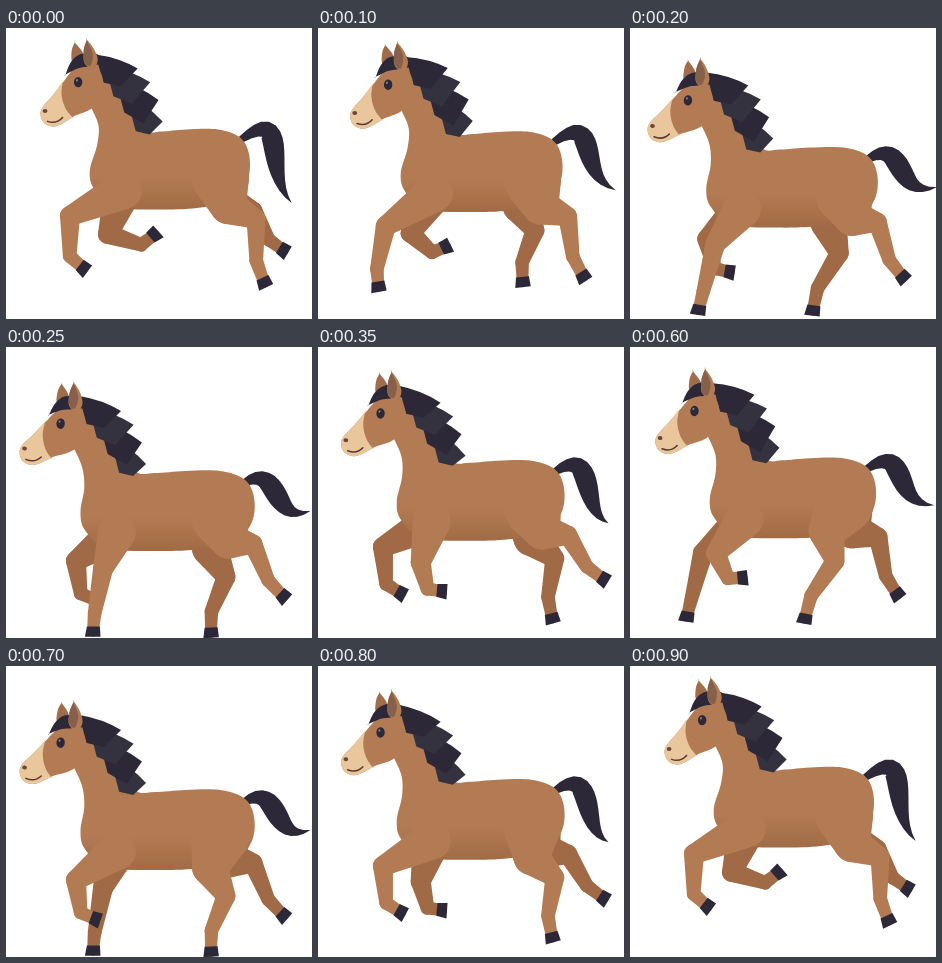
Animation, 306 px wide and 291 px high, one loop 950 ms. Source, as an HTML page with a canvas:

```html
<!DOCTYPE html>
<html lang="en">
<head>
<meta charset="utf-8">
<title>Trotting horse</title>
<style>
html, body { margin: 0; width: 100%; height: 100%; overflow: hidden; background: #fff; }
canvas { display: block; width: 306px; height: 291px; }
</style>
</head>
<body>
<canvas id="stage"></canvas>
<script>
const W = 306, H = 291, LOOP = 950, STEP = 50, STRIDE = 900, BOB = STRIDE / 2;
const COAT = '#b27b53', FAR = '#9f6a45', DARK = '#2c2838', LOCK = '#35323f', PALE = '#eac69c', EAR = '#87604b';
const canvas = document.getElementById('stage');
const ctx = canvas.getContext('2d');
const dpr = window.devicePixelRatio || 1;
canvas.width = W * dpr;
canvas.height = H * dpr;

// Key poses of one leg: middle joint, then hoof
const TIMES = [0, 150, 250, 450, 600, 700];
const FORE = [[64, 188, 77, 240], [73, 206, 57, 269], [97, 222, 87, 284],
  [102, 206, 148, 207], [86, 206, 112, 231], [70, 214, 89, 253]];
const HIND = [[250, 191, 258, 254], [248, 190, 267, 247], [247, 197, 277, 249],
  [247, 183, 277, 222], [205, 214, 175, 271], [220, 230, 205, 285]];

const TORSO = [[86, 80], [93, 98], [91, 118], [84, 142], [88, 160], [107, 178], [150, 181],
  [195, 179], [228, 169], [242, 150], [243, 126], [234, 109], [212, 101], [180, 101],
  [155, 103], [141, 101], [122, 70], [105, 38], [88, 30], [72, 50]];

const clamp = (v, lo, hi) => Math.max(lo, Math.min(hi, v));
const mix = (a, b, u) => a.map((v, i) => v + (b[i] - v) * u);

// Point on a Bezier curve of any degree
function bezier(pts, u) {
  while (pts.length > 1) pts = pts.slice(1).map((p, i) => mix(pts[i], p, u));
  return pts[0];
}

// Smooth periodic interpolation between key poses
function pose(keys, t) {
  const n = TIMES.length;
  const at = i => {
    const turn = Math.floor(i / n), j = i - turn * n;
    return { t: TIMES[j] + turn * STRIDE, v: keys[j] };
  };
  t %= STRIDE;
  let i = n - 1;
  while (TIMES[i] > t) i--;
  const [a, b, c, d] = [at(i - 1), at(i), at(i + 1), at(i + 2)];
  const h = c.t - b.t, u = (t - b.t) / h;
  const reach = (p, q, s) => p.v.map((v, j) => (q.v[j] - v) / (q.t - p.t) * h / 3 * s);
  const out = reach(a, c, 1), back = reach(b, d, -1);
  const [x, y, hx, hy] = bezier([b.v, b.v.map((v, j) => v + out[j]), c.v.map((v, j) => v + back[j]), c.v], u);
  return [[x, y], [hx, hy]];
}

// Point at fraction u from a to b, pushed sideways
function bend(a, b, u, push) {
  const dx = b[0] - a[0], dy = b[1] - a[1], len = Math.hypot(dx, dy);
  return [a[0] + dx * u - dy / len * push, a[1] + dy * u + dx / len * push];
}

function poly(pts, fill) {
  ctx.beginPath();
  pts.forEach(p => ctx.lineTo(p[0], p[1]));
  ctx.closePath();
  ctx.fillStyle = fill;
  ctx.fill();
}

// Closed curve through the points; a doubled point makes a corner
function blob(pts, fill) {
  const n = pts.length, at = i => pts[(i + n) % n];
  ctx.beginPath();
  ctx.moveTo(pts[0][0], pts[0][1]);
  for (let i = 0; i < n; i++) {
    const [a, b, c, d] = [at(i - 1), at(i), at(i + 1), at(i + 2)];
    ctx.bezierCurveTo(b[0] + (c[0] - a[0]) / 6, b[1] + (c[1] - a[1]) / 6,
      c[0] - (d[0] - b[0]) / 6, c[1] - (d[1] - b[1]) / 6, c[0], c[1]);
  }
  ctx.fillStyle = fill;
  ctx.fill();
}

function oval(x, y, rx, ry, fill) {
  ctx.beginPath();
  ctx.ellipse(x, y, rx, ry, 0, 0, 7);
  ctx.fillStyle = fill;
  ctx.fill();
}

// Chain of tapered capsules ending in a hoof
function leg(pts, radii, fill) {
  let dir;
  ctx.fillStyle = fill;
  for (let i = 0; i + 1 < pts.length; i++) {
    const [a, b] = [pts[i], pts[i + 1]], [ra, rb] = [radii[i], radii[i + 1]];
    const dx = b[0] - a[0], dy = b[1] - a[1];
    const off = Math.acos(clamp((ra - rb) / Math.hypot(dx, dy), -1, 1));
    dir = Math.atan2(dy, dx);
    ctx.beginPath();
    ctx.arc(a[0], a[1], ra, dir + off, dir - off + 2 * Math.PI);
    ctx.arc(b[0], b[1], rb, dir - off, dir + off);
    ctx.closePath();
    ctx.fill();
  }
  ctx.save();
  ctx.translate(...pts[pts.length - 1]);
  ctx.rotate(dir);
  poly([[-5, -6.5], [5, -8], [6.5, 7.5], [-4, 6.5]], DARK);
  ctx.restore();
}

function legs(t, k, fill) {
  const hip = [214, 148 + 22 * k], [hock, heel] = pose(HIND, t);
  leg([hip, bend(hip, hock, .5, 13), hock, bend(hock, heel, .65, 5), heel], [29, 18, 9.5, 6.8, 5.8], fill);

  // A shortened foreleg folds at the fetlock
  const shoulder = [117 - 6 * k, 162 + 23 * k], [knee, toe] = pose(FORE, t);
  const fold = clamp(64 - Math.hypot(toe[0] - knee[0], toe[1] - knee[1]), 0, 10);
  leg([shoulder, knee, bend(knee, toe, .72, fold), toe], [19, 10, 6.8, 5.8], fill);
}

function tail(k, wave) {
  const x = 235 + 3 * k, y = 111 + 25 * k;
  const spine = [[x, y], [x + 50 - 13 * k, y - 36 + 14 * k], [255 + 10 * k, y + 30 + 13 * k],
    [296 - 11 * Math.cos(wave + .35), 168 + 10 * Math.cos(wave + .8)]];
  const left = [], right = [];
  for (let s = 0; s < 1; s += 1 / 16) {
    const p = bezier(spine, s), q = bezier(spine, s + .01);
    const w = 3.5 * (1 - s) + 8.5 * Math.sin(Math.PI * s);
    left.push(bend(p, q, 0, w));
    right.unshift(bend(p, q, 0, -w));
  }
  poly([...left, spine[3], ...right], DARK);
}

function mane(k, wave) {
  const crest = [[90, 26], [113, 50], [144, 106]], tips = [[132, 40], [154, 58], [157, 93]];
  ctx.save();
  ctx.translate(-17 * k, 23 * k);
  for (let i = 3; i >= 0; i--) {
    const u = i / 5, root = bezier(crest, u), end = bezier(crest, Math.min(1, u + .5));
    const inner = bezier(crest, u + .22), [tx, ty] = bezier(tips, i / 3);
    const tip = [tx, ty - 3 * Math.sin(wave)];
    const over = mix(root, tip, .5), under = mix(tip, end, .5);
    ctx.beginPath();
    ctx.moveTo(...root);
    ctx.quadraticCurveTo(over[0] + 2, over[1] - 4, ...tip);
    ctx.quadraticCurveTo(under[0] - 1, under[1] + 1, ...end);
    ctx.lineTo(inner[0] - 3, inner[1] + 16);
    ctx.closePath();
    ctx.fillStyle = i % 2 ? LOCK : DARK;
    ctx.fill();
  }
  ctx.restore();
}

function head(k) {
  ctx.save();
  ctx.translate(72 - 18 * k, 54 + 23 * k);
  ctx.rotate(.113 * k);
  ctx.translate(-72, -54);
  blob([[69, 14], [69, 14], [66, 22], [67, 34], [78, 34], [77, 24]], '#a06d4c');
  blob([[76, 32], [64, 45], [58, 53], [47, 67], [37, 79], [35, 87], [39, 95], [48, 98],
    [57, 95], [68, 88], [86, 80], [98, 66], [94, 42]], COAT);
  blob([[57, 53], [57, 53], [47, 67], [37, 79], [35, 87], [39, 95], [48, 98], [57, 95],
    [67, 89], [67, 89], [60, 80], [56, 67]], PALE);
  blob([[60, 46], [60, 46], [65, 34], [74, 26], [90, 25], [97, 34], [82, 38], [72, 40]], DARK);
  blob([[81, 11], [81, 11], [78, 22], [79, 35], [88, 40], [92, 31], [88, 20]], COAT);
  blob([[81, 12], [81, 12], [78, 22], [79, 34], [85, 37], [87, 25]], EAR);
  oval(72.5, 53.7, 4.2, 5.2, DARK);
  oval(71.3, 51.8, 1, 1.2, '#85808a');
  oval(39.5, 82.5, 2.4, 2, '#6b4639');
  ctx.beginPath();
  ctx.moveTo(42, 93);
  ctx.quadraticCurveTo(51, 96, 57, 89);
  ctx.strokeStyle = '#583a31';
  ctx.lineWidth = 1.5;
  ctx.lineCap = 'round';
  ctx.stroke();
  ctx.restore();
}

function torso(k) {
  const coat = ctx.createLinearGradient(0, 95 + 22 * k, 0, 183 + 22 * k);
  coat.addColorStop(0, COAT);
  coat.addColorStop(.6, COAT);
  coat.addColorStop(1, '#a06a45');
  // The body stretches a little as it sinks, and the neck leans forward
  blob(TORSO.map(([x, y]) => {
    const lean = clamp((165 - x) / 25, 0, 1) * clamp((130 - y) / 25, 0, 1);
    return [x + k * ((x - 190) * .09 - 8 * lean), y + 23 * k];
  }), coat);
}

function draw(t) {
  const dip = (1 - Math.cos(2 * Math.PI * (t - 32) / BOB)) / 2;
  const k = dip ** 1.3, wave = 2 * Math.PI * t / BOB;
  ctx.setTransform(dpr, 0, 0, dpr, 0, 0);
  ctx.fillStyle = '#fff';
  ctx.fillRect(0, 0, W, H);
  tail(k, wave);
  legs(t + BOB, k, FAR);
  torso(k);
  legs(t, k, COAT);
  mane(k, wave);
  head(k);
}

function tick() {
  draw(Math.floor(performance.now() % LOOP / STEP) * STEP);
  requestAnimationFrame(tick);
}
tick();
</script>
</body>
</html>
```
